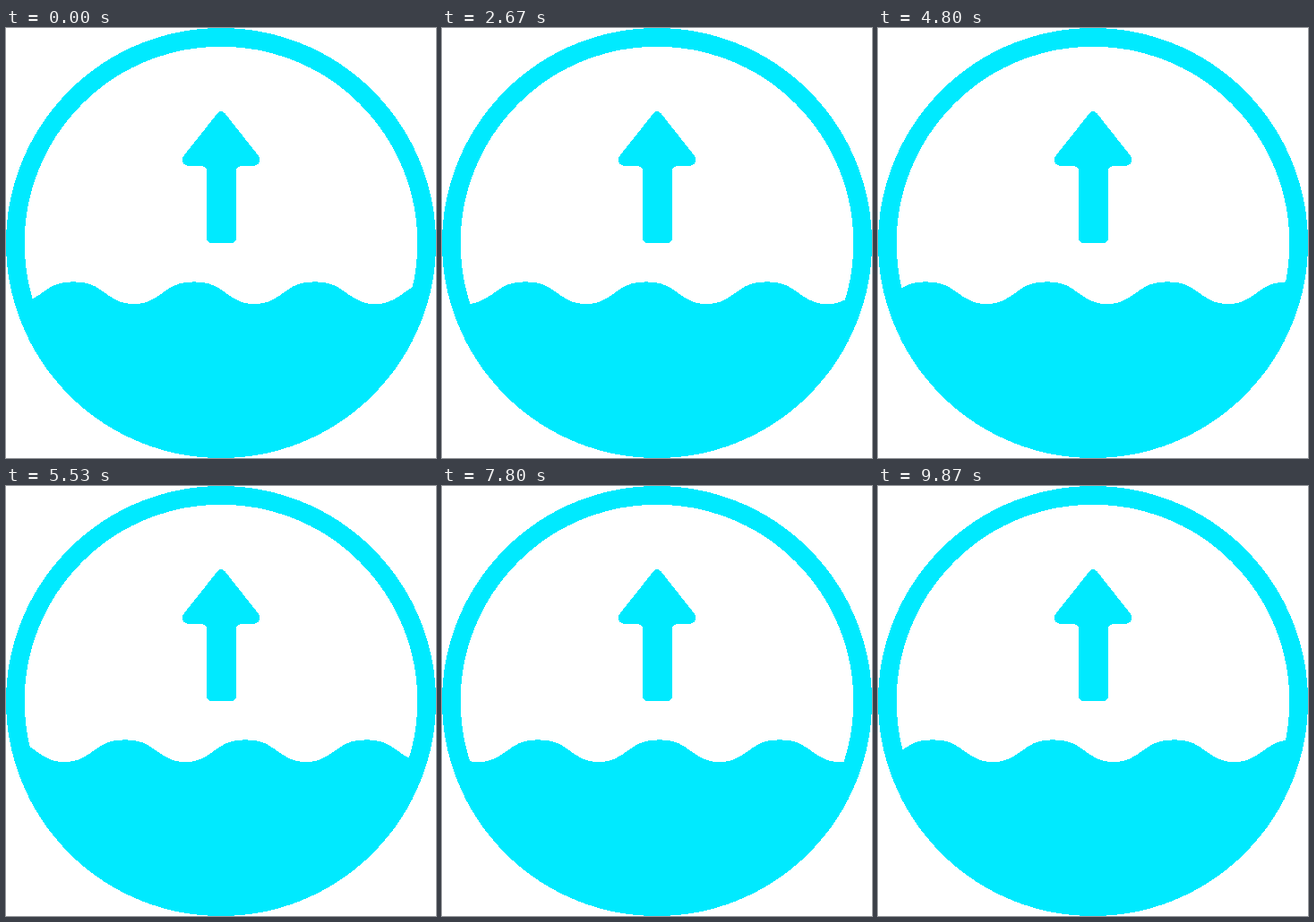
An HTML page with a canvas that plays this animation: 480 by 480 pixels, repeating every 9940 ms.

```html
<!DOCTYPE html>
<html lang="en">
<head>
<meta charset="utf-8">
<title>Rising water</title>
<style>
  html, body { margin: 0; width: 100%; height: 100%; overflow: hidden; background: #fff; }
  canvas { display: block; width: 480px; height: 480px; }
</style>
</head>
<body>
<canvas id="stage" width="480" height="480"></canvas>
<script>
const ctx = document.getElementById("stage").getContext("2d", { willReadFrequently: true });
const COLOR = "#00eaff";
const LOOP = 9940;
const STEP = 1000 / 15;
const RING = { outer: 240, inner: 219.3 };
const WAVE = { length: 134.7, period: 1250, crest: 210, mid: 295.2, height: 12.95, broad: 0.6, steep: 0.7 };

const disc = new Path2D();
disc.arc(240, 240, 235, 0, Math.PI * 2);

const arrow = new Path2D(
  "M236 95.2 Q240.2 91 244.4 95.2 L281.7 142.5 Q285 147 282 151 Q280 154 275.5 154" +
  "H263.5 Q257 154 257 160 V234 Q257 240 250.5 240 H230.5 Q224 240 224 234" +
  "V160 Q224 154 217.5 154 H204.5 Q200 154 198 151 Q195 147 198.5 142.5 Z"
);

function waterLevel(x, crest) {
  const angle = (x - crest) / WAVE.length * Math.PI * 2;
  return WAVE.mid - WAVE.height * Math.cos(angle)
    + WAVE.broad * Math.cos(2 * angle) + WAVE.steep * Math.cos(3 * angle);
}

function drawWater(time) {
  const crest = WAVE.crest + WAVE.length * time / WAVE.period;
  ctx.save();
  ctx.clip(disc);
  ctx.beginPath();
  ctx.moveTo(0, 480);
  for (let x = 0; x <= 480; x += 2) ctx.lineTo(x, waterLevel(x, crest));
  ctx.lineTo(480, 480);
  ctx.fill();
  ctx.restore();
}

// Makes every pixel fully opaque or fully clear, for hard stepped edges.
function hardenEdges() {
  const image = ctx.getImageData(0, 0, 480, 480);
  const pixels = new Uint32Array(image.data.buffer);
  const solid = 0xffffea00;
  for (let i = 0; i < pixels.length; i++) pixels[i] = pixels[i] >>> 31 ? solid : 0;
  ctx.putImageData(image, 0, 0);
}

function draw(time) {
  ctx.clearRect(0, 0, 480, 480);
  ctx.fillStyle = ctx.strokeStyle = COLOR;
  drawWater(time);
  ctx.lineWidth = RING.outer - RING.inner;
  ctx.beginPath();
  ctx.arc(240, 240, (RING.outer + RING.inner) / 2, 0, Math.PI * 2);
  ctx.stroke();
  ctx.fill(arrow);
  hardenEdges();
}

let start, shown;
function tick(now) {
  start ??= now;
  const time = (now - start) % LOOP;
  // The wave advances in 15 steps per second; times are rounded to 10 ms.
  const step = Math.min(148, Math.floor((time + 3.4) / STEP));
  if (step !== shown) draw(step * STEP);
  shown = step;
  requestAnimationFrame(tick);
}
draw(0);
requestAnimationFrame(tick);
</script>
</body>
</html>
```
